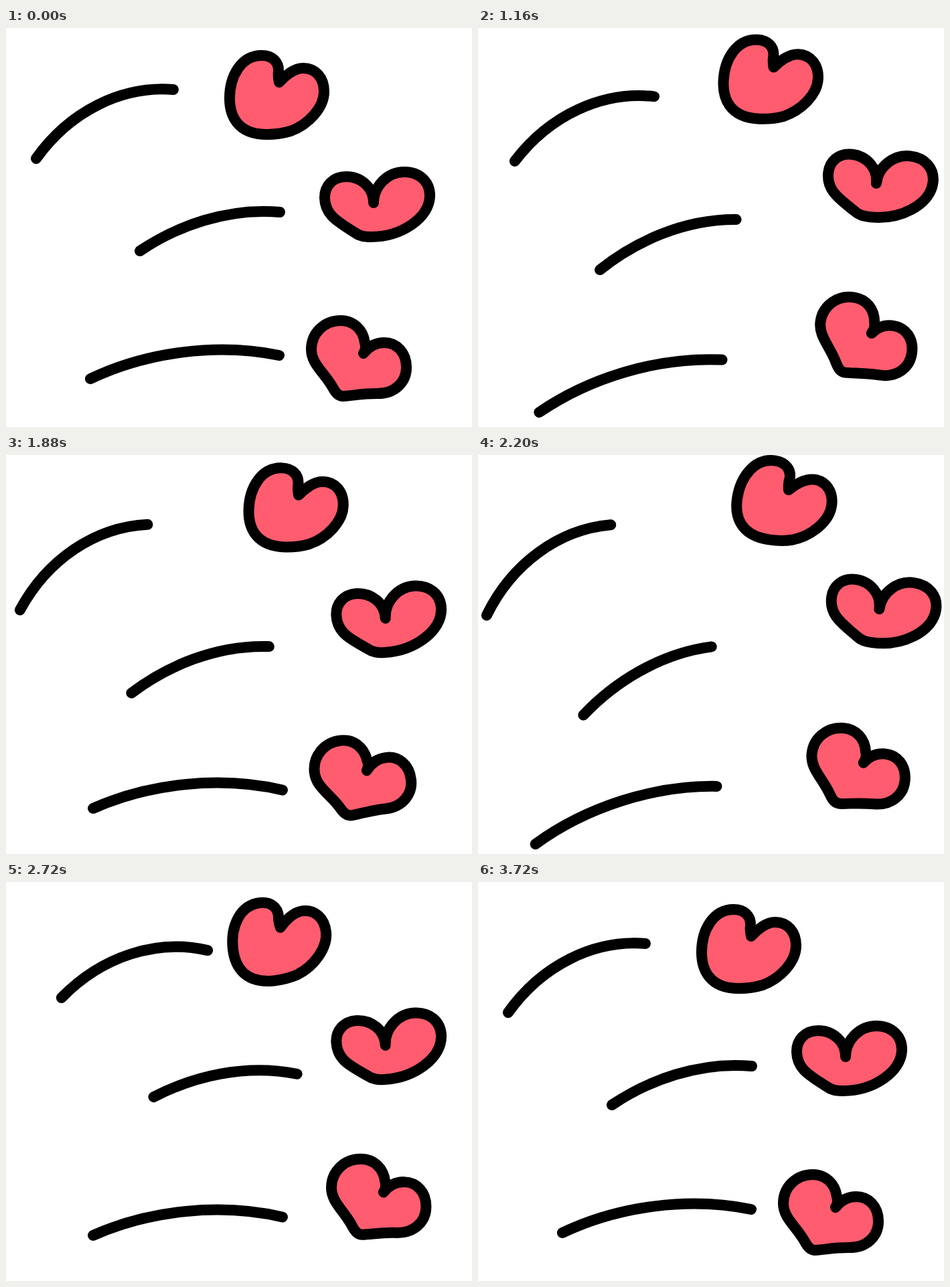
An HTML page for the animation above (4440 ms loop, 696 by 596 pixels).

```html
<!DOCTYPE html>
<html lang="en">
<head>
<meta charset="utf-8">
<title>Flying hearts</title>
<style>
  html, body { margin: 0; width: 100%; height: 100%; overflow: hidden; background: #fff; }
  svg { display: block; }
  path { fill: none; stroke: #000; stroke-width: 16; stroke-linecap: round; stroke-linejoin: round; }
  .heart { fill: #ff5c6f; }
</style>
</head>
<body>
<svg id="stage" width="696" height="596" viewBox="0 0 696 596"></svg>
<script>
const LOOP = 4440, GRID = 40, FIRST_STEP = 167, STEP = 63.85;

// Each part swings rest > out > back > out > back > rest.
// pivot: [x, y]; out and back: [dx, dy, degrees]; peak: step of the first "out" pose.
const parts = [
  { d: 'M45 195C95 125 172 86 250 92', pivot: [147.5, 143.5],
    out: [-51, 32, -11.3], back: [44.5, -6, 8.7], peak: 10 },
  { d: 'M200 333C255 296 330 268 409 275', pivot: [304.5, 304],
    out: [-51.5, 33.5, -12.6], back: [29, -2.7, 7.9], peak: 11.75 },
  { d: 'M126 524C210 484 315 470 408 489', pivot: [267, 506.5],
    out: [-50, 33.5, -11.6], back: [25, -2, 6.5], peak: 13.5 },
  { d: 'M408 81Q406 71 407 65C408 50 397 41 382 41C351 41 334 72 334 105C334 130 345 159 390 159' +
       'C401 159 415 157 425 154C452 144 475 119 475 95C475 74 462 60 444 60C430 60 416 72 408 81Z',
    heart: true, pivot: [408, 81], out: [56, -29, 8.7], back: [-2.5, -11.8, -7.5], peak: 11.75 },
  { d: 'M549 261C549 238 530 222 508 222C488 222 476 236 476 253C476 280 497 290 520 305' +
       'C528 311 535 312 545 312C590 312 633 284 633 250C633 230 618 215 595 215C570 215 549 236 549 261Z',
    heart: true, pivot: [549, 261], out: [53, -32, 8.7], back: [4.4, -11.5, -7.3], peak: 13.5 },
  { d: 'M534 486C538 480 537 473 536 470C533 449 518 437 500 437C475 437 456 456 456 480' +
       'C456 502 475 514 488 537C493 546 497 550 504 550C520 549 530 546 555 546' +
       'C582 546 598 528 598 507C598 484 583 470 565 470C550 470 540 478 534 486Z',
    heart: true, pivot: [534, 486], out: [54.5, -30.3, 9], back: [1, -13.5, -7.8], peak: 15.25 }
];

const stage = document.getElementById('stage');
for (const part of parts) {
  part.node = document.createElementNS('http://www.w3.org/2000/svg', 'path');
  part.node.setAttribute('d', part.d);
  if (part.heart) part.node.setAttribute('class', 'heart');
  stage.append(part.node);
}

const ease = x => (1 - Math.cos(Math.PI * x)) / 2;

function poseAt({ out, back, peak }, step) {
  const rest = [0, 0, 0];
  const poses = [rest, out, back, out, back, rest];
  const times = [-10.25, 0, 10, 20, 30, 40.5].map(offset => peak + offset);
  if (step <= times[0] || step >= times[5]) return rest;
  const i = times.findIndex(time => time > step) - 1;
  const mix = ease((step - times[i]) / (times[i + 1] - times[i]));
  return poses[i].map((from, axis) => from + (poses[i + 1][axis] - from) * mix);
}

function draw() {
  const time = performance.now() % LOOP;
  const tick = (Math.floor(time / GRID) + 1) * GRID;
  const step = Math.ceil((tick - FIRST_STEP) / STEP) - 1;
  for (const part of parts) {
    const [dx, dy, angle] = poseAt(part, step);
    part.node.setAttribute('transform', `translate(${dx} ${dy}) rotate(${angle} ${part.pivot})`);
  }
  requestAnimationFrame(draw);
}
draw();
</script>
</body>
</html>
```
